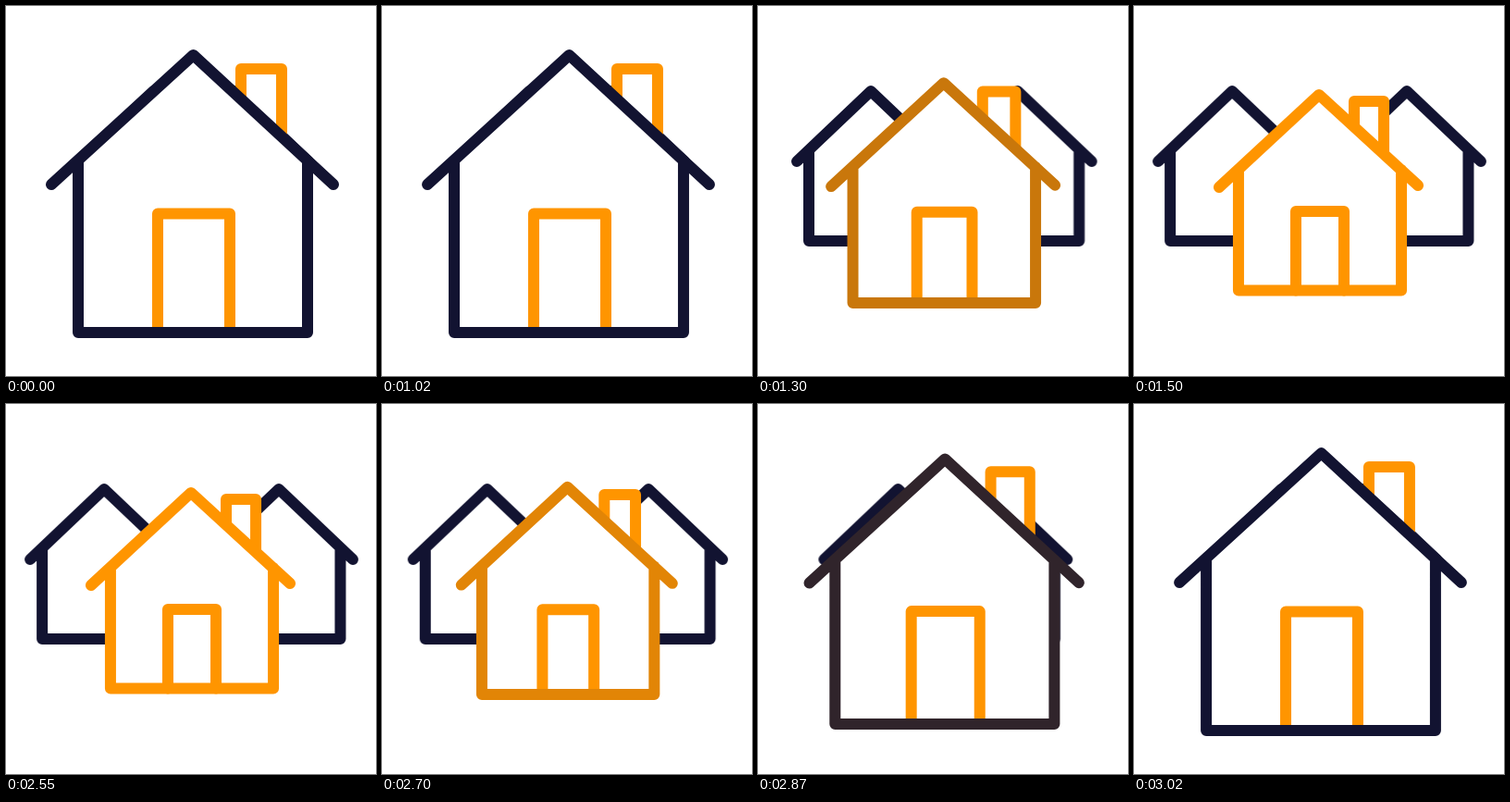
An HTML page for the animation above (3.05 s loop, 400 by 400 pixels).

```html
<!DOCTYPE html>
<html lang="en">
<head>
<meta charset="utf-8">
<title>Houses</title>
<style>
  :root { --navy: #121331; --orange: #ff9500; }
  html, body { margin: 0; width: 100%; height: 100%; overflow: hidden; background: #fff; }
  svg { display: block; width: 100%; height: 100%; }

  path {
    fill: none;
    stroke: var(--orange);
    stroke-width: 12;
    stroke-linecap: round;
    stroke-linejoin: round;
  }

  /* Each shape morphs from --one (single house) to --many (row of houses). */
  .morph { animation: morph 3050ms cubic-bezier(.67, 0, .33, 1) infinite; }
  .side { stroke: var(--navy); animation: slide 3050ms cubic-bezier(.67, 0, .33, 1) infinite; }

  .left { --tuck: 53.5px; }
  .right { --tuck: -48px; }

  .chimney {
    fill: #fff;
    --one: path("M254 100V68H298V140");
    --many: path("M238 131V103H270V160");
  }
  .body {
    fill: #fff;
    stroke: none;
    --one: path("M78 353V167L202.5 53L326 167V353Z");
    --many: path("M113 307.5V177L200 96L289 177V307.5Z");
  }
  .door {
    --one: path("M164 353V224.5H242V353");
    --many: path("M175 307.5V222H227V307.5");
  }
  .frame {
    --one: path("M78 167V353H326V167M49 193L202.5 53L354 193");
    --many: path("M113 177V307.5H289V177M92 196L200 96L307 194");
    animation: morph 3050ms cubic-bezier(.67, 0, .33, 1) infinite,
               tint 3050ms infinite;
  }

  @keyframes morph {
    0%, 32.787%, 100% { d: var(--one); }
    50%, 82.787% { d: var(--many); }
  }
  @keyframes slide {
    0%, 32.787%, 100% { transform: translateX(var(--tuck)); }
    50%, 82.787% { transform: none; }
  }
  @keyframes tint {
    0%, 100% { stroke: var(--navy); }
    32.787% { stroke: var(--navy); animation-timing-function: cubic-bezier(.81, 0, .19, 1); }
    50% { stroke: var(--orange); }
    82.787% { stroke: var(--orange); animation-timing-function: cubic-bezier(.74, 0, .26, 1); }
  }
</style>
</head>
<body>
<svg viewBox="0 0 400 400">
  <path class="side left" d="M39 156V254H173V156M26 168L106 92L186 168"/>
  <path class="side right" d="M361.5 156V254H228V156M375 168L295 92L215 168"/>
  <path class="morph chimney"/>
  <path class="morph body"/>
  <path class="morph door"/>
  <path class="frame"/>
</svg>
</body>
</html>
```
